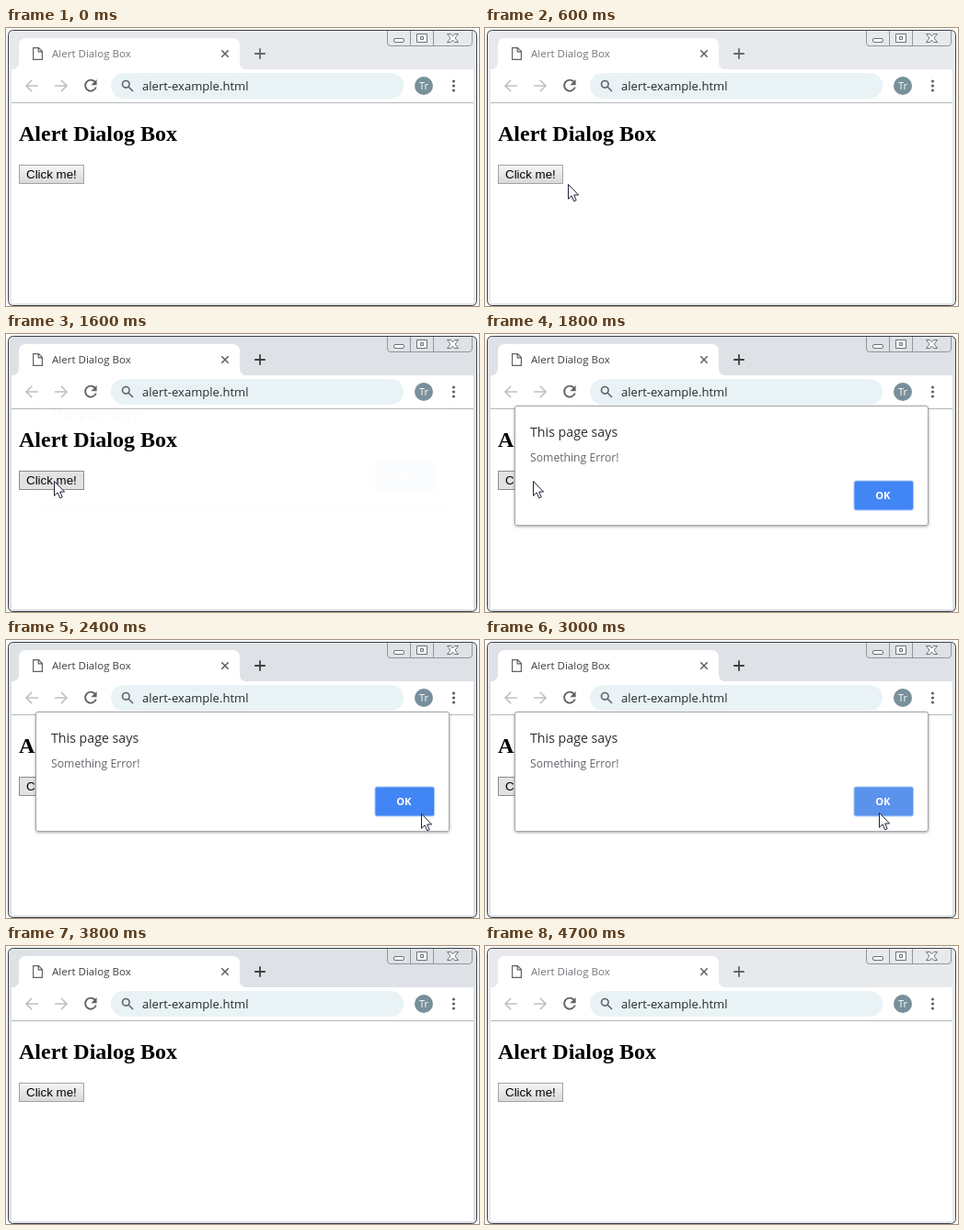
An HTML page for the animation above (4800 ms loop, 514 by 303 pixels).

```html
<!DOCTYPE html>
<html lang="en">
<head>
<meta charset="utf-8">
<title>Alert dialog demo</title>
<style>
  html, body { margin: 0; width: 100%; height: 100%; overflow: hidden; background: #fff; }
  svg { display: block; width: 514px; height: 303px; }
  text { font-family: "Open Sans", "Noto Sans", sans-serif; white-space: pre; }
  .line { fill: none; stroke: #5f6368; stroke-width: 1.6; }
  .glyph { fill: #fff; stroke: #6d7278; stroke-width: 1; }
</style>
</head>
<body>
<svg viewBox="0 0 514 303">
  <defs>
    <linearGradient id="face" x2="0" y2="1">
      <stop offset="0" stop-color="#f5f5f5"/>
      <stop offset="1" stop-color="#d9d9d9"/>
    </linearGradient>
    <filter id="shadow" x="-5%" y="-10%" width="110%" height="125%">
      <feDropShadow dx="0" dy="1" stdDeviation="1.5" flood-opacity=".35"/>
    </filter>
  </defs>

  <!-- window frame and tab strip -->
  <rect id="frame" x="2.5" y="2.5" width="509" height="300" rx="5" stroke="#3c4046"/>
  <rect x="6" y="45" width="502" height="255" fill="#fff"/>
  <path d="M6 45.5Q14 45 14 37V19Q14 11 22 11H246Q254 11 254 19V37Q254 45 262 45.5Z" fill="#fff"/>
  <path d="M6 81.5H508" stroke="#b4b6b9"/>
  <path class="line" style="stroke-width:1.2" d="M29.6 21.6H35.5L39.4 25.5V34.4H29.6ZM35.2 21.6V25.8H39.4"/>
  <text id="title" x="50" y="32" font-size="11.55">Alert Dialog Box</text>
  <path class="line" d="M234.3 24.3L241.7 31.7M241.7 24.3L234.3 31.7"/>
  <path id="plus" class="line" style="stroke-width:1.8" d="M270.2 28H281.8M276 22.2V33.8"/>

  <!-- window controls -->
  <path d="M414.5 3V16Q414.5 19.5 418 19.5H503Q506.5 19.5 506.5 16V3M439.5 3V19M464.5 3V19" fill="none" stroke="#92969c"/>
  <rect class="glyph" x="421.5" y="11.5" width="11" height="4" rx="1.5"/>
  <path class="glyph" fill-rule="evenodd" d="M446.5 6.5H457.5V15.5H446.5ZM450.5 9.5H453.5V12.5H450.5Z"/>
  <path class="glyph" d="M479.5 6.5H483.5L485.5 9 487.5 6.5H491.5L488 11 491.5 15.5H487.5L485.5 13 483.5 15.5H479.5L483 11Z"/>

  <!-- toolbar -->
  <path class="line" style="stroke:#bdc0c3" d="M35 63H22M28.2 56.8L22 63 28.2 69.2M53 63H66M59.8 56.8L66 63 59.8 69.2"/>
  <path class="line" style="stroke-width:1.9" d="M96.6 58.6A6 6 0 1 0 97.8 64.5"/>
  <path d="M98.6 56V62.2H92.4Z" fill="#5f6368"/>
  <rect x="114" y="49" width="318" height="28" rx="14" fill="#e9f3f6"/>
  <circle class="line" cx="130.3" cy="61.3" r="3.8"/>
  <path class="line" d="M133 64L138 69"/>
  <text x="148" y="68" font-size="13.05" fill="#25282c">alert-example.html</text>
  <circle cx="454" cy="63" r="10" fill="#78909c"/>
  <text x="454" y="67" font-size="11" fill="#fff" text-anchor="middle">Tr</text>
  <g fill="#5f6368">
    <circle cx="486.5" cy="58" r="1.6"/>
    <circle cx="486.5" cy="63" r="1.6"/>
    <circle cx="486.5" cy="68" r="1.6"/>
  </g>

  <!-- page -->
  <text x="14" y="123" font-size="24" font-weight="700" style="font-family:'Liberation Serif',serif">Alert Dialog Box</text>
  <rect id="button" x="14.5" y="149.5" width="70" height="20"/>
  <text x="22" y="164" font-size="13.333" style="font-family:'Liberation Sans',sans-serif">Click me!</text>

  <g id="dialog">
    <rect x="32.5" y="78.5" width="449" height="130" rx="2.5" fill="#fff" stroke="#a6a6a6" filter="url(#shadow)"/>
    <text x="49" y="112" font-size="14.2" fill="#2b2e32">This page says</text>
    <text x="49" y="139" font-size="12.2" fill="#63676c">Something Error!</text>
    <rect x="400.5" y="159.5" width="65.5" height="33" rx="3" fill="#a9c8fa"/>
    <rect id="ok" x="401.5" y="160.5" width="63.5" height="31" rx="2"/>
    <text x="432.3" y="180" font-size="11.2" font-weight="700" fill="#fff" text-anchor="middle">OK</text>
  </g>

  <path id="cursor" d="M.5 .5V16.3L4.1 12.9 6.7 18.8 9.2 17.7 6.7 12H11.6Z" fill="#fff" stroke="#20233a"/>
</svg>
<script>
const LOOP = 4800;
const part = id => document.getElementById(id);

// Each row: start time in ms, then x and y of the tip; no position hides the cursor.
const cursorSteps = [
  [0], [200, 496, 88], [300, 363, 172], [400, 264, 188], [500, 164, 184],
  [600, 90, 170], [700, 68, 170], [800, 56, 163], [900, 52, 160],
  [1900, 112, 170], [2000, 286, 182], [2100, 364, 187], [2200, 404, 189],
  [2400, 451, 189], [2500, 428, 188], [3600, 425, 208], [3700, 421, 237], [3800]
];
// Each row: start time in ms, opacity, vertical offset.
const dialogSteps = [
  [0, 0, 0], [1600, 0.02, -20], [1700, 0.6, -8], [1800, 1, 0], [3100, 0.3, -12], [3200, 0, 0]
];
const buttonSteps = [
  [0, 'url(#face)', '#a3a3a3'], [900, '#e9e9e9', '#8c8c8c'],
  [1500, '#e2e2e2', '#8c8c8c'], [3200, 'url(#face)', '#a3a3a3']
];

const valueAt = (steps, t) => steps.findLast(step => step[0] <= t).slice(1);

function setAttributes(id, attributes) {
  for (const name in attributes) part(id).setAttribute(name, attributes[name]);
}

function draw(t) {
  const active = t >= 1500 && t < 4700;
  setAttributes('frame', { fill: active ? '#dee1e6' : '#e7e9ed' });
  setAttributes('title', { fill: active ? '#3c4043' : '#74787d' });
  part('plus').style.stroke = active ? '#3c4043' : '#63676c';

  const [fill, stroke] = valueAt(buttonSteps, t);
  setAttributes('button', { fill, stroke });

  const [opacity, offset] = valueAt(dialogSteps, t);
  setAttributes('dialog', { opacity, transform: `translate(0 ${offset})` });
  setAttributes('ok', { fill: t >= 2900 ? '#5b92ec' : '#4285f4' });

  const [x, y] = valueAt(cursorSteps, t);
  const visible = x !== undefined;
  setAttributes('cursor', { visibility: visible ? 'visible' : 'hidden' });
  if (visible) setAttributes('cursor', { transform: `translate(${x} ${y})` });
}

const start = performance.now();
function tick() {
  draw((performance.now() - start) % LOOP);
  requestAnimationFrame(tick);
}
tick();
</script>
</body>
</html>
```
